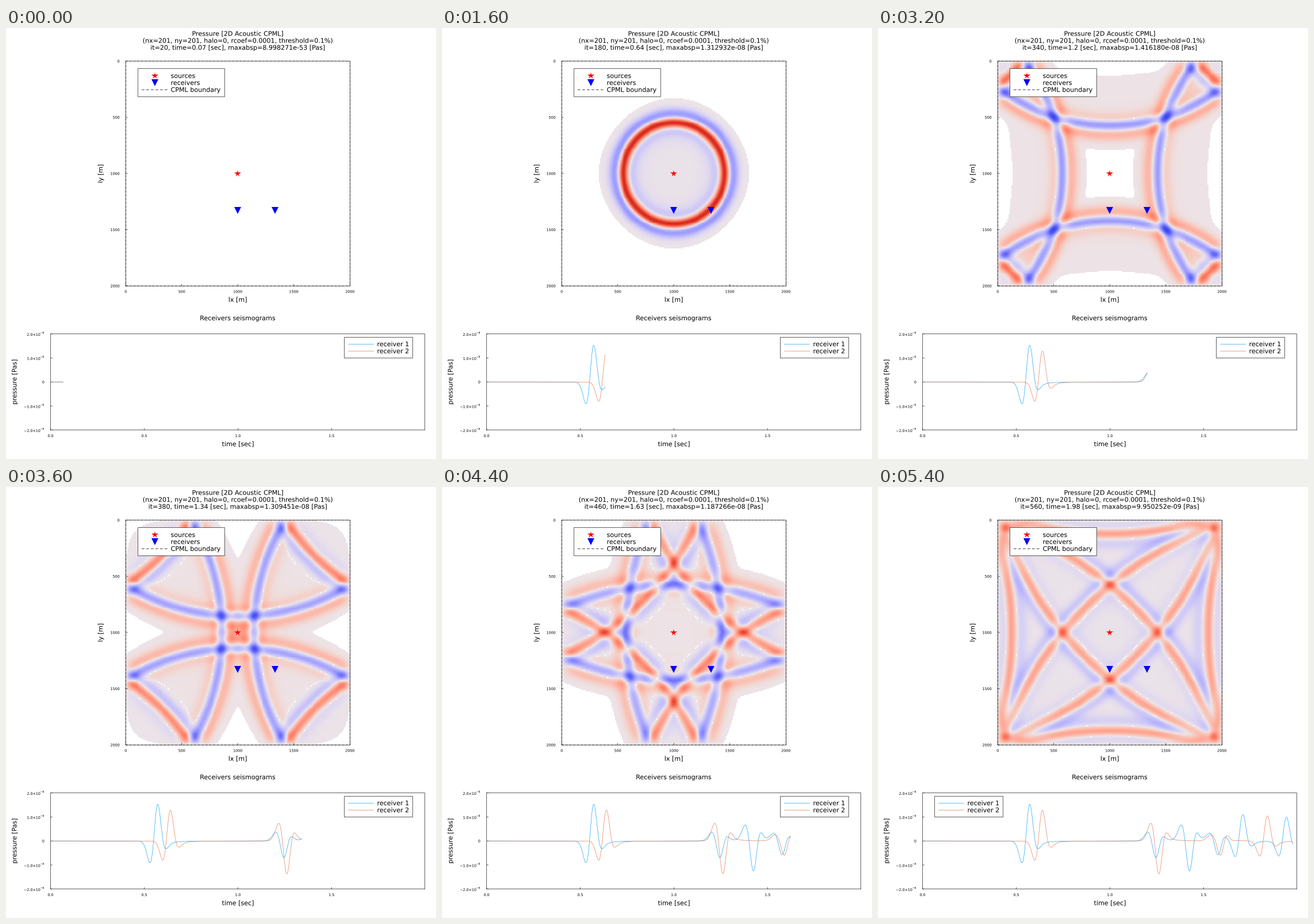
Animation of 748x749 px, one loop 5600 ms. Source, as a matplotlib script:

```python
import numpy as np
import matplotlib as mpl
import matplotlib.pyplot as plt
from matplotlib.animation import FuncAnimation
from matplotlib.colors import LinearSegmentedColormap
from matplotlib.patches import PathPatch, Rectangle
from matplotlib.textpath import TextPath
from matplotlib.transforms import Affine2D

mpl.rcParams.update({"font.family": "DejaVu Sans", "path.snap": False})

W, H, DPI = 748, 749, 64
PX = 72 / DPI                       # points per pixel
BIG, SMALL = 11.1, 6.35             # font sizes in pixels
THIN = 0.62                         # line width in pixels

# ---- 2D acoustic wave, fixed edges, Ricker source in the middle ----
N, DX, C = 201, 10.0, 2000.0
DT = DX / (C * np.sqrt(2))          # at the stability limit
F0, T0 = 10.0, 0.4
FRAMES, STEP = 28, 20
STEPS = FRAMES * STEP
T_END = 565 * DT
P_LIM = 2e-8
MID, REC = 100, 133


def ricker(t):
    a = (np.pi * F0 * (t - T0)) ** 2
    return (1 - 2 * a) * np.exp(-a)


def simulate():
    old, cur = np.zeros((N, N)), np.zeros((N, N))
    snaps, traces = [], np.zeros((2, STEPS))
    for it in range(STEPS):
        new = np.zeros((N, N))
        new[1:-1, 1:-1] = 0.5 * (cur[:-2, 1:-1] + cur[2:, 1:-1]
                                 + cur[1:-1, :-2] + cur[1:-1, 2:]) - old[1:-1, 1:-1]
        new[MID, MID] += DT ** 2 / DX ** 2 * ricker(it * DT)
        old, cur = cur, new
        traces[:, it] = cur[REC, MID], cur[REC, REC]
        if (it + 1) % STEP == 0:
            snaps.append(cur)
    return snaps, traces


snaps, traces = simulate()
times = np.arange(STEPS) * DT

# ---- diverging blue / red map ----
STOPS = [(-1, 10, 30, 120), (-.75, 45, 65, 225), (-.6, 82, 92, 245),
         (-.5, 112, 116, 252), (-.4, 147, 146, 255), (-.3, 173, 170, 254),
         (-.2, 196, 192, 250), (-.1, 218, 211, 243), (0, 237, 228, 232),
         (.1, 246, 204, 194), (.2, 254, 179, 162), (.3, 255, 153, 132),
         (.4, 253, 122, 99), (.5, 243, 90, 68), (.6, 226, 58, 42),
         (.75, 184, 18, 22), (1, 105, 0, 15)]
cmap = LinearSegmentedColormap.from_list(
    "bwr_soft", [((v + 1) / 2, (r / 255, g / 255, b / 255)) for v, r, g, b in STOPS], N=256)
cmap.set_bad("white")

# ---- stage: one axes in pixel units, y downwards ----
fig = plt.figure(figsize=(W / DPI, H / DPI), dpi=DPI, facecolor="white")
ax = fig.add_axes([0, 0, 1, 1])

X0, X1, Y0, Y1 = 208.2, 598.3, 57.6, 448.2      # pressure map
U0, U1, V0, V1 = 77.5, 728.6, 531.6, 698.7      # seismograms


def map_x(m):
    return X0 + (X1 - X0) * m / 2000


def map_y(m):
    return Y0 + (Y1 - Y0) * m / 2000


def time_x(t):
    return U0 + (U1 - U0) * t / T_END


def pres_y(p):
    return (V0 + V1) / 2 - (V1 - V0) / 2 * p / P_LIM


def glyphs(x, y, s, size=BIG, ha="center", angle=0):
    """Text outline with its baseline at y, placed without pixel rounding."""
    path = TextPath((0, 0), s, size=size)
    ink = path.get_extents()
    shift = {"left": 0, "center": -(ink.x0 + ink.x1) / 2, "right": -ink.x1}[ha]
    move = Affine2D().translate(shift, 0).scale(1, -1).rotate_deg(-angle).translate(x, y)
    return path.transformed(move)


def text(*args, z=6, **kw):
    return ax.add_patch(PathPatch(glyphs(*args, **kw), fc="black", lw=0, zorder=z))


def line(xs, ys, color="black", lw=THIN, z=4, **kw):
    return ax.plot(xs, ys, color=color, lw=lw * PX, zorder=z, **kw)[0]


def box(x0, x1, y0, y1, fill="none", z=3):
    return ax.add_patch(Rectangle((x0, y0), x1 - x0, y1 - y0, fc=fill, ec="black",
                                  lw=THIN * PX, zorder=z))


def mark(x, y, shape, color, size, z=5):
    ax.plot([x], [y], marker=shape, color=color, ms=size * PX, mew=0, ls="none", zorder=z)


# pressure map
half = map_x(5) - X0
image = ax.imshow(np.full((N, N), np.nan), cmap=cmap, vmin=-P_LIM, vmax=P_LIM,
                  extent=[X0 - half, X1 + half, Y1 + half, Y0 - half],
                  interpolation="nearest", aspect="auto", zorder=1)
image.set_clip_path(Rectangle((X0, Y0), X1 - X0, Y1 - Y0, transform=ax.transData))
box(X0, X1, Y0, Y1)
DASH = (0, (4 / THIN, 2.6 / THIN))
for xs, ys in (((X0, X0), (Y0, Y1)), ((X1, X1), (Y0, Y1)),
               ((X0, X1), (Y0, Y0)), ((X0, X1), (Y1, Y1))):
    line(xs, ys, ls=DASH, z=3)
for m in range(0, 2001, 500):
    x, y = map_x(m), map_y(m)
    line((x, x), (Y1, Y1 - 3))
    line((X0, X0 + 3), (y, y))
    text(x, 460.3, str(m), SMALL)
    text(197.3, y + 2.4, str(m), SMALL, "right")
text(403.2, 475.8, "lx [m]")
text(168.2, 253, "ly [m]", angle=90)

mark(map_x(1000), map_y(1000), "*", "red", 11.6)
for m in (1000, 1330):
    mark(map_x(m), map_y(1330), "v", "blue", 11.6)

# map legend
box(229.5, 380.5, 70.5, 119.3, "white", 6)
mark(258.6, 83, "*", "red", 12.4, 7)
mark(258.6, 95, "v", "blue", 12.6, 7)
line((236, 281), (107.2, 107.2), lw=0.75, ls=DASH, z=7)
for i, s in enumerate(("sources", "receivers", "CPML boundary")):
    text(286.6, 86.9 + 12.1 * i, s, ha="left", z=7)

# titles
text(403.2, 13.6, "Pressure [2D Acoustic CPML]")
text(403.2, 25.7, "(nx=201, ny=201, halo=0, rcoef=0.0001, threshold=0.1%)")
text(403.2, 507.9, "Receivers seismograms")


def status_path(k):
    it = (k + 1) * STEP
    return glyphs(403.2, 37.8, f"it={it}, time={round(float(it * DT), 2)} [sec], "
                               f"maxabsp={np.abs(snaps[k]).max():.6e} [Pas]")


status = ax.add_patch(PathPatch(status_path(0), fc="black", lw=0, zorder=6))

# seismogram axes
box(U0, U1, V0, V1)
for t in (0, 0.5, 1, 1.5):
    x = time_x(t)
    line((x, x), (V1, V1 - 3))
    text(x, 710.9, f"{t:.1f}", SMALL)
for k in (-2, -1, 0, 1, 2):
    y = pres_y(k * 1e-8)
    line((U0, U0 + 3), (y, y))
    if k:
        sign = "\u2212" if k < 0 else ""
        text(59.4, y + 3.4, f"{sign}{abs(k)}.0\u00d710", SMALL, "right")
        text(59.6, y - 0.5, "\u22128", SMALL * 0.72, "left")
    else:
        text(66.4, y + 2.4, "0", SMALL, "right")
text(403.2, 726.7, "time [sec]")
text(18.4, 615, "pressure [Pas]", angle=90)

COLORS = ("#009afa", "#e36f47")
curves = [line([], [], c) for c in COLORS]


def trace_legend(x):
    parts = [box(x, x + 119, 537.5, 573.5, "white", 6)]
    for i, c in enumerate(COLORS):
        y = 549.3 + 12.2 * i
        parts.append(line((x + 7, x + 51), (y, y), c, z=7))
        parts.append(text(x + 57, y + 3.8, f"receiver {i + 1}", ha="left", z=7))
    return parts


legend_right, legend_left = trace_legend(588.5), trace_legend(98.5)

ax.set_xlim(0, W)
ax.set_ylim(H, 0)
ax.axis("off")


def update(k):
    it = (k + 1) * STEP
    p = snaps[k]
    image.set_data(np.where(np.abs(p) > 1e-3 * P_LIM, p, np.nan))
    status.set_path(status_path(k))
    for curve, trace in zip(curves, traces):
        curve.set_data(time_x(times[:it]), pres_y(trace[:it]))
    # the legend leaves the top right corner once a trace enters it
    late = times[:it] > 0.75 * T_END
    crowded = bool((traces[:, :it][:, late] > P_LIM / 2).any())
    for part in legend_right:
        part.set_visible(not crowded)
    for part in legend_left:
        part.set_visible(crowded)
    return [image, status, *curves]


anim = FuncAnimation(fig, update, frames=FRAMES, interval=200, repeat=True, blit=False)
plt.show()
```
